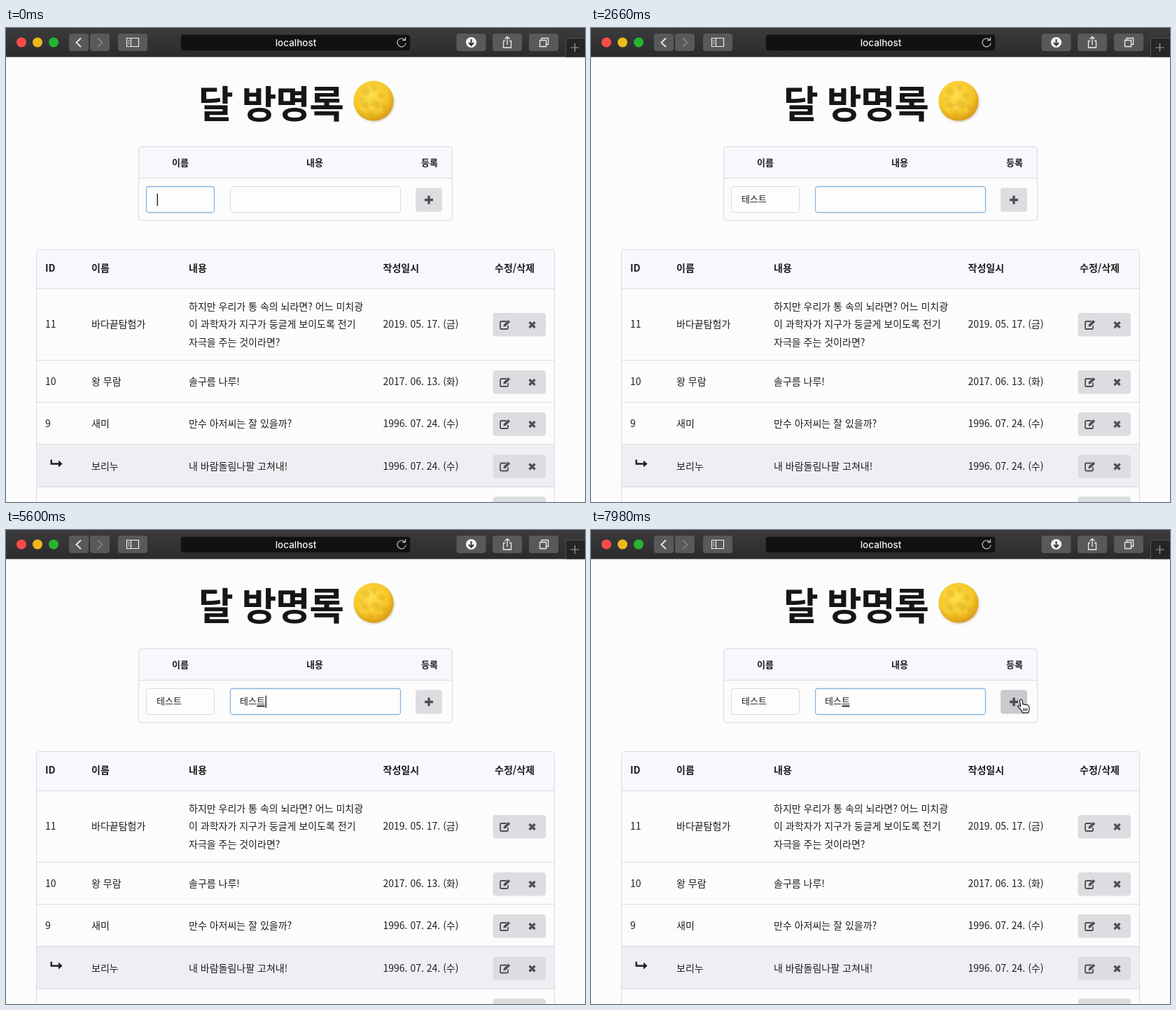
Write an HTML page that moves like this. It is 827 by 677 pixels and loops after 8000 ms.

```html
<!DOCTYPE html>
<html lang="ko">
<head>
<meta charset="utf-8">
<title>달 방명록</title>
<style>
html, body { margin: 0; width: 100%; height: 100%; overflow: hidden; background: #fcfcfc; }
svg { display: block; width: 100vw; height: 100vh; }
text { font: 14px "Noto Sans CJK KR", "Noto Sans CJK", sans-serif; fill: #1e1e20; }
.head { font-weight: 700; }
.form { font-size: 13px; font-weight: 700; text-anchor: middle; }
.field { font-size: 13px; }
.title { font-size: 54px; font-weight: 900; letter-spacing: -1.5px; fill: #161618; }
.url { font: 500 13.5px Inter, sans-serif; fill: #f4f4f4; text-anchor: middle; }
.line { fill: none; stroke: #d9dbe4; }
</style>
</head>
<body>
<svg id="stage" viewBox="0 0 827 677" preserveAspectRatio="none">
  <defs>
    <linearGradient id="bar" x2="0" y2="1">
      <stop stop-color="#3b3b3d"/><stop offset="1" stop-color="#2b2b2d"/>
    </linearGradient>
    <radialGradient id="moon" cx=".42" cy=".36" r=".66">
      <stop stop-color="#ffe04c"/><stop offset=".65" stop-color="#f6c728"/><stop offset="1" stop-color="#d69814"/>
    </radialGradient>
    <filter id="soft"><feGaussianBlur stdDeviation="1.5"/></filter>
    <g id="edit">
      <path d="M4 -5H-5.5Q-7 -5 -7 -3.5V4.5Q-7 6 -5.5 6H2.5Q4 6 4 4.5V1" fill="none" stroke="#4e4f53" stroke-width="1.8"/>
      <path d="M-3 3L-2.5 -0.5L4.5 -7.2L7.5 -4.2L0.5 2.6Z" fill="#4e4f53" stroke="#dcdde1" stroke-width=".7"/>
    </g>
    <path id="cross" d="M-4 -4L4 4M4 -4L-4 4" fill="none" stroke="#4e4f53" stroke-width="3.2"/>
  </defs>
  <rect width="827" height="677" fill="#fcfcfc"/>
  <g id="chrome"></g>
  <g id="page"></g>
  <rect id="nameBox" x="200.5" y="226.5" width="97" height="37" rx="3.5" fill="#fdfdfd"/>
  <rect id="bodyBox" x="320.5" y="226.5" width="243" height="37" rx="3.5" fill="#fdfdfd"/>
  <rect id="add" x="585" y="228.5" width="38" height="34" rx="4"/>
  <path d="M604 239.5V251.5M598 245.5H610" stroke="#4e4f53" stroke-width="3.4"/>
  <text id="nameText" class="field" x="215" y="249"/>
  <text id="bodyText" class="field" x="334" y="249"/>
  <rect id="underline" y="250.5" width="11" height="2" fill="#222"/>
  <rect id="caret" y="236.5" width="1.3" height="17.5" fill="#111"/>
  <g id="pointer">
    <path id="arrow" d="M0 0V16.3L3.8 12.8L6.3 18.8L9.1 17.6L6.6 11.8H11.6Z" fill="#050505" stroke="#fff" stroke-width="1.1"/>
    <path id="hand" d="M-1.6 1.5Q-1.6 -.5 .2 -.5Q1.8 -.5 2 1.4L2.8 6.6Q4.2 5.6 5.4 7Q6.8 6 8 7.5Q10 6.7 11 8.8Q12.6 11 11.8 14.6L10.8 18.6H2.4Q1.6 15.6 -.7 13.5L-4 10Q-4.8 8.5 -3.4 8Q-2.2 7.8 -.3 9.7ZM3.9 12V16M6.2 12V16M8.5 12V16" fill="#fff" stroke="#111" stroke-width="1.15" stroke-linejoin="round"/>
  </g>
</svg>
<script>
const LOOP = 8000, BLINK = 1060, CHAR = 12;
const el = Object.fromEntries([...document.querySelectorAll('#stage [id]')].map(n => [n.id, n]));

const box = (x, y, w, h, r, fill) => `<rect x="${x}" y="${y}" width="${w}" height="${h}" rx="${r}" fill="${fill}"/>`;
const label = (x, y, s, cls = '') => `<text x="${x}" y="${y}" class="${cls}">${s}</text>`;
const stroke = (d, color, w = 1.4) => `<path d="${d}" fill="none" stroke="${color}" stroke-width="${w}"/>`;
const dot = (x, y, r, fill) => `<circle cx="${x}" cy="${y}" r="${r}" fill="${fill}"/>`;

function drawChrome() {
  const pale = '#ededed';
  const buttons = [[90, 28], [120, 28], [160, 42], [643.5, 42], [695, 42], [747, 42]];
  return box(0, 0, 827, 41.5, 0, 'url(#bar)') +
    dot(22, 20.5, 7, '#fb4b48') + dot(45, 20.5, 7, '#edb91c') + dot(68, 20.5, 7, '#27b42f') +
    buttons.map(([x, w]) => box(x, 8, w, 25, 4, '#59595b')).join('') +
    stroke('M107 14.5L100.5 20.8L107 27', pale, 1.8) + stroke('M131 14.5L137.5 20.8L131 27', '#89898b', 1.6) +
    stroke('M172.5 14.5H189.5V26.5H172.5ZM178.5 14.5V26.5M174.5 17.5H176.5M174.5 20H176.5M174.5 22.5H176.5', pale, 1.2) +
    box(249, 9, 329, 24, 4, '#4a4a4c') + box(249.5, 9.5, 328, 23, 4, '#111112') +
    label(414, 26, 'localhost', 'url') +
    stroke('M569.8 17.2A6 6 0 1 0 571 21.5M570.5 13V17.5H566', '#b9b9b9', 1.3) +
    dot(664.5, 20.5, 7.6, '#f2f2f2') + stroke('M664.5 16V24.5M661 21L664.5 24.7L668 21', '#39393b', 2) +
    stroke('M713 18.5H710.5V28H721.5V18.5H719M716 24V12.5M712.5 15.8L716 12.3L719.5 15.8', pale, 1.3) +
    stroke('M762.5 17.5H771.5V26.5H762.5ZM765 17.5V14.5H774.5V23.5H771.5', pale, 1.3) +
    box(799, 14, 28, 27.5, 0, '#252527') + stroke('M799.5 41.5V14.5H827', '#505052', 1) +
    stroke('M812.5 22V34M806.5 28H818.5', '#a4a4a0', 1.2);
}

function drawMoon() {
  const craters = [[514, 91, 6], [526, 86, 4], [536, 97, 5], [513, 110, 5], [528, 109, 7], [540, 113, 4], [521, 122, 4], [508, 101, 3]];
  return `<ellipse cx="526" cy="106" rx="28.5" ry="28" fill="#8d7742" opacity=".4" filter="url(#soft)"/>` +
    dot(525, 104, 28.5, 'url(#moon)') +
    `<g opacity=".25" filter="url(#soft)">${craters.map(c => dot(...c, '#c88f18')).join('')}</g>` +
    `<g opacity=".4" filter="url(#soft)">${craters.slice(1, 6).map(([x, y, r]) => dot(x - 4, y + 5, r / 2, '#ffe879')).join('')}</g>`;
}

function drawTable() {
  const rows = [
    [423, '11', '바다끝탐험가', ['하지만 우리가 통 속의 뇌라면? 어느 미치광', '이 과학자가 지구가 둥글게 보이도록 전기', '자극을 주는 것이라면?'], '2019. 05. 17. (금)'],
    [505, '10', '왕 무람', ['솔구름 나루!'], '2017. 06. 13. (화)'],
    [565, '9', '새미', ['만수 아저씨는 잘 있을까?'], '1996. 07. 24. (수)'],
    [625.5, '', '보리누', ['내 바람돌림나팔 고쳐내!'], '1996. 07. 24. (수)']
  ];
  const heads = [[56, 'ID'], [122, '이름'], [261, '내용'], [538.5, '작성일시'], [698, '수정/삭제']];
  const actions = y => box(695.5, y - 16, 75.5, 33.5, 4, '#dcdde1');
  let out = box(43.5, 316, 740, 57, 4, '#f6f8fc') + box(43.5, 595, 740, 60, 0, '#eeeff2') +
    `<path class="line" d="M43.5 677V320Q43.5 316.5 47 316.5H780Q783.5 316.5 783.5 320V677"/>` +
    [372.5, 474.5, 534.5, 594.5, 655.5].map(y => `<path class="line" d="M43.5 ${y}H783.5"/>`).join('') +
    heads.map(([x, s]) => label(x, 348, s, 'head')).join('');
  for (const [y, id, name, lines, date] of rows) {
    const base = y + 5;
    out += label(56, base, id) + label(122, base, name) + label(538.5, base, date) +
      lines.map((s, i) => label(261, base + (i - (lines.length - 1) / 2) * 25.5, s)).join('') +
      actions(y) + `<use href="#edit" x="713" y="${y + 1}"/><use href="#cross" x="751.5" y="${y + 1}"/>`;
  }
  return out + actions(685.5) +
    stroke('M64.7 616.5V622.5H77', '#1e1e20', 2.4) + '<path d="M75 617.5L80.5 622.5L75 627.5Z" fill="#1e1e20"/>';
}

function drawForm() {
  return box(190, 170, 447, 45, 4, '#f6f8fc') +
    '<rect class="line" x="189.5" y="169.5" width="448" height="105.5" rx="4"/><path class="line" d="M189.5 214.5H637.5"/>' +
    label(249, 197, '이름', 'form') + label(441, 197, '내용', 'form') + label(605, 197, '등록', 'form');
}

el.chrome.innerHTML = drawChrome();
el.page.innerHTML = label(275, 129, '달 방명록', 'title') + drawMoon() + drawForm() + drawTable();

const steps = ['ㅌ', '테', '테ㅅ', '테스', '테슽', '테스트'];
const nameKeys = [960, 1070, 1180, 1270, 1360, 1450];
const bodyKeys = [4740, 4850, 4960, 5050, 5140, 5230];
const TAB = 2030;
const path = [[6350, 690, 276], [6700, 660.5, 247.5], [7150, 622, 244], [7500, 614, 242.5]];

const clamp = v => Math.max(0, Math.min(1, v));
const ease = v => v * v * (3 - 2 * v);
const typed = (keys, t) => steps[keys.filter(k => k <= t).length - 1] || '';

function pointerAt(t) {
  let [, x, y] = path[0];
  for (let i = 1; i < path.length; i++) {
    const [t0, x0, y0] = path[i - 1], [t1, x1, y1] = path[i];
    if (t < t0) break;
    const p = ease(clamp((t - t0) / (t1 - t0)));
    x = x0 + (x1 - x0) * p;
    y = y0 + (y1 - y0) * p;
  }
  return [x, y];
}

function caretAlpha(t) {
  const since = Math.max(0, ...[TAB, ...nameKeys, ...bodyKeys].filter(k => k <= t));
  const phase = (t - since) % BLINK;
  return 1 - clamp((phase - 490) / 90) + clamp((phase - 1000) / 60);
}

function focusBox(node, on) {
  node.setAttribute('stroke', on ? '#8ab4dc' : '#dadbe1');
  node.setAttribute('stroke-width', on ? 1.3 : 1);
}

function render(t) {
  const inBody = t >= TAB;
  const name = typed(nameKeys, t), body = typed(bodyKeys, t);
  const active = inBody ? body : name;
  const left = inBody ? 334 : 215;
  el.nameText.textContent = name;
  el.bodyText.textContent = body;
  focusBox(el.nameBox, !inBody);
  focusBox(el.bodyBox, inBody);

  const end = left + active.length * CHAR;
  el.caret.setAttribute('x', end + .6);
  el.caret.setAttribute('opacity', caretAlpha(t));
  el.underline.setAttribute('x', end - 11.5);
  el.underline.setAttribute('opacity', active.length > 1 ? 1 : 0);

  const [x, y] = pointerAt(t);
  const over = t > path[0][0] && x < 623;
  el.pointer.setAttribute('transform', `translate(${x} ${y})`);
  el.pointer.setAttribute('visibility', t >= path[0][0] ? 'visible' : 'hidden');
  el.arrow.setAttribute('opacity', over ? 0 : 1);
  el.hand.setAttribute('opacity', over ? 1 : 0);
  el.add.setAttribute('fill', over ? '#c9cace' : '#dcdde1');
}

const start = performance.now();
function tick() {
  render((performance.now() - start) % LOOP);
  requestAnimationFrame(tick);
}
tick();
</script>
</body>
</html>
```
